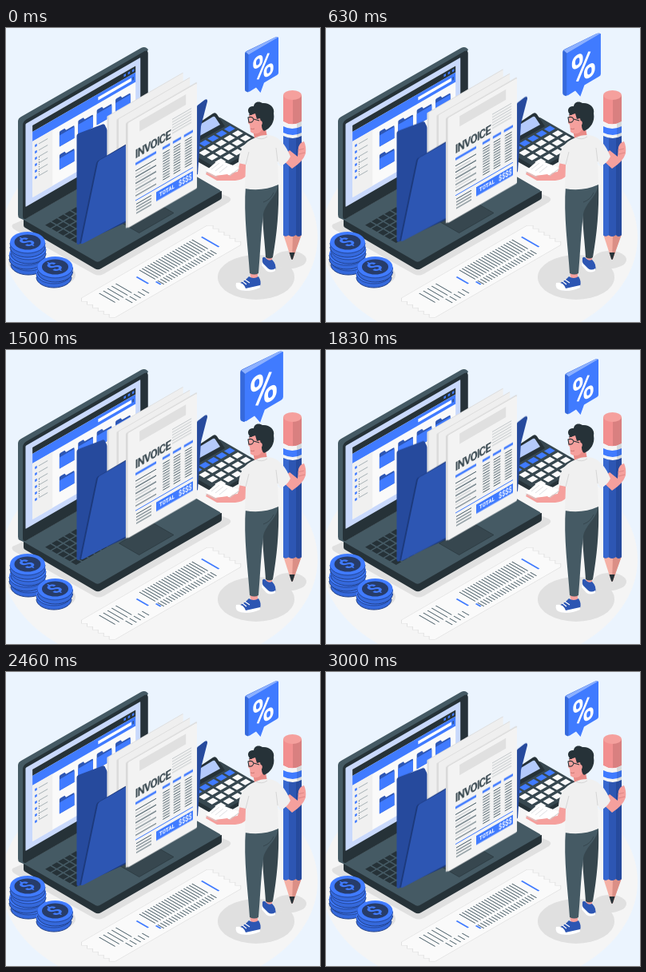
An HTML page that plays this animation: 393 px wide and 368 px high, repeating every 3040 ms.

```html
<!DOCTYPE html>
<html lang="en">
<head>
<meta charset="utf-8">
<title>Invoice on a laptop</title>
<style>
  html, body { margin: 0; width: 100%; height: 100%; overflow: hidden; background: #ebf4fe; }
  svg { display: block; width: 393px; height: 368px; }
  text { font-family: Roboto, "Liberation Sans", sans-serif; font-weight: 700; }
  .rise { animation: rise 3040ms linear infinite; }
  .pulse { transform-origin: 320px 46px; animation: pulse 3040ms linear infinite; }
  @keyframes rise { 50% { transform: translateY(var(--lift)); } }
  @keyframes pulse {
    0%, 30%, 40%, 60%, 100% { transform: scale(1); }
    10%, 50% { transform: scale(1.3); }
  }
</style>
</head>
<body>
<svg viewBox="0 0 393 368" fill="none">
  <defs>
    <g id="disc">
      <path d="M-22 0v6a22 13 0 0 0 44 0v-6z" fill="#3569dc"/>
      <path d="M-22 6a22 13 0 0 0 44 0" stroke="#203f86"/>
      <path d="M-22 1a22 13 0 0 0 44 0" stroke="#264a9d"/>
      <ellipse rx="22" ry="13" fill="#407bff"/>
    </g>
    <g id="coin">
      <use href="#disc"/>
      <ellipse rx="16.500" ry="9.600" fill="#273c69"/>
      <text transform="matrix(.866 -.5 .866 .5 -1 0)" x="-6" y="7.500" font-size="22" fill="#407bff">$</text>
    </g>
    <g id="file">
      <path d="M0 1.500q0-1.500 1.500-1.500h6l2 3H20q1.500 0 1.500 1.500V19H0z" fill="#2d56b3"/>
      <path d="M0 19V6q0-1 1-1h19.500q1 0 1 1v13z" fill="#407bff"/>
    </g>
  </defs>

  <ellipse cx="192" cy="262" rx="198" ry="138" fill="#f5f5f5"/>
  <g fill="#e0e0e0">
    <path d="M8 246q-2 4 4 7l98 55q6 3 12 0l157-90q5-4-1-7l-100-40z"/>
    <ellipse cx="313" cy="312" rx="48" ry="28"/>
    <ellipse cx="355" cy="290" rx="21" ry="11"/>
    <ellipse cx="28" cy="294" rx="25" ry="14"/>
    <ellipse cx="62" cy="309" rx="25" ry="14"/>
  </g>

  <!-- receipt -->
  <g transform="matrix(.866 -.5 .866 .5 95 338)">
    <path id="slip" d="M0 0H181l4 4-4 4 4 4-4 4 4 4-4 4 4 4-4 4 4 4-4 4 4 4-4 4H0l-4-4 4-4-4-4 4-4-4-4 4-4-4-4 4-4-4-4 4-4-4-4z" fill="#fafafa" stroke="#e0e0e0" stroke-width="1.500" paint-order="stroke"/>
    <path d="M163 10v25M66 13v17M74 33v7" stroke="#407bff" stroke-width="2"/>
    <g stroke="#455a64">
      <path d="M76 18H156" stroke-width="23" stroke-dasharray="1.100 2.900"/>
      <path d="M76 37.500H156" stroke-width="9" stroke-dasharray="1.100 2.900"/>
      <path d="M18 18H46" stroke-width="23" stroke-dasharray="1 5"/>
      <path d="M30 37.500H58" stroke-width="10" stroke-dasharray="1 5"/>
    </g>
  </g>

  <!-- laptop base -->
  <path d="M22 240V247q0 2 2 3l87 51q4 2.500 8 0l149-86q2-1 2-3v-8z" fill="#263238"/>
  <g transform="matrix(.866 -.5 .866 .5 22 240)">
    <rect width="179" height="107" rx="3" fill="#455a64"/>
    <g stroke="#263238" stroke-width="7.500" stroke-dasharray="7.500 1.800">
      <path d="M9 26H169M9 35.300H169M9 44.600H169M9 53.900H169M9 63.200H169"/>
    </g>
    <rect x="67" y="71" width="50" height="29" fill="#37474f" stroke="#2b3940" stroke-width=".7"/>
  </g>

  <!-- laptop screen -->
  <path d="M15 117q0-4 4-6L169 25q4-2 7 0l2 2-5 9L24 241l-7-3q-2-1-2-4z" fill="#455a64"/>
  <g transform="matrix(.866 -.5 0 1 21 117)">
    <rect width="181" height="124" rx="5" fill="#263238"/>
    <rect x="4" y="5" width="166" height="104" rx="1" fill="#c9d9fc"/>
    <g transform="translate(14 12)">
      <rect width="149" height="90" fill="#fafafa"/>
      <rect width="149" height="8" fill="#263238"/>
      <rect y="8" width="149" height="12" fill="#407bff"/>
      <path d="M95 14H143" stroke="#fff" stroke-width="4"/>
      <path d="M145 14h1" stroke="#263238" stroke-width="4"/>
      <path d="M132 4h3M138 4h3M144 4h3" stroke="#407bff" stroke-width="3"/>
      <rect y="20" width="29" height="70" fill="#f0f0f0"/>
      <path d="M5 26V74" stroke="#407bff" stroke-width="3" stroke-dasharray="3 5"/>
      <path d="M15.500 27V74" stroke="#a6b0b5" stroke-width="13" stroke-dasharray="1 7"/>
      <path d="M9.500 44V66" stroke="#455a64" stroke-dasharray="1 2"/>
      <use href="#file" x="39" y="27"/><use href="#file" x="66" y="27"/>
      <use href="#file" x="93" y="27"/><use href="#file" x="120" y="27"/>
      <use href="#file" x="39" y="56"/><use href="#file" x="66" y="56"/>
    </g>
  </g>

  <!-- calculator -->
  <path d="M209 144v6l57 32 56-32v-6z" fill="#263238"/>
  <g transform="matrix(.866 -.5 .866 .5 216 140)">
    <rect x="-8" width="66" height="66" rx="3" fill="#37474f"/>
    <g stroke-width="7.500" stroke-dasharray="9 3">
      <path d="M-1.500 23H55" stroke="#407bff"/>
      <path d="M-1.500 34.500H55M-1.500 46H55M-1.500 57.500H55" stroke="#fafafa"/>
    </g>
  </g>
  <path d="M232 125l27-18q3-2 5 1l10 15-35 20z" fill="#263238"/>
  <path d="M234 126l25-15q2-1 3 1l6 9-31 17z" fill="#b4cafb"/>

  <!-- folder back -->
  <g class="rise" style="--lift:-8px">
    <path d="M88.500 135q0-2 2-3l29-11q4-2 5 2l3 6 108-22 4-10 9-7q4-2 3.500 2l-8 31-4 60L95 269l-4.500 2q-2 0-2-2z" fill="#264a9d"/>
  </g>

  <!-- sheets -->
  <g class="rise" style="--lift:-10px">
    <g transform="matrix(.866 -.5 0 1 129 110)">
      <rect x="-3" y="-1" width="110" height="106" rx="1" fill="#dedede"/>
      <rect width="107" height="105" rx="1" fill="#efefef"/>
    </g>
  </g>
  <g class="rise" style="--lift:-12px">
    <g transform="matrix(.866 -.5 0 1 141 114)">
      <rect x="-3" y="-1" width="106" height="106" rx="1" fill="#dcdcdc"/>
      <rect width="103" height="105" rx="1" fill="#efefef"/>
    </g>
  </g>

  <!-- folder front -->
  <g class="rise" style="--lift:-8px">
    <path d="M92 270l21-101q1-3 4-4l34-20v98z" fill="#1d3a7c"/>
    <path d="M94 269.500l21-101q.5-2 3-3.500l34.500-19.500V240L97 269.500q-3 1.500-3 0z" fill="#2d56b3"/>
  </g>

  <g class="rise" style="--lift:-15px">
    <g transform="matrix(.866 -.5 0 1 152.500 119)">
      <rect x="-3" y="-1.500" width="103" height="132" rx="1.500" fill="#d9d9d9"/>
      <rect width="100" height="131.500" rx="1.500" fill="#f3f3f3"/>
      <rect x="17" y="6" width="67" height="13" fill="#e0e0e0"/>
      <path d="M78 27V46" stroke="#c2c7ca" stroke-width="28" stroke-dasharray="1 2.500"/>
      <text x="10.500" y="50" font-size="15" letter-spacing="-.9" fill="#37474f">INVOICE</text>
      <path d="M11 57H41M50 57H61M65 57H77M81 57H94" stroke="#407bff" stroke-width="3"/>
      <g stroke="#455a64">
        <path d="M26 65V99" stroke-width="30" stroke-dasharray="1.100 6.700"/>
        <path d="M22 69V99" stroke-width="22" stroke="#a9b1b5" stroke-dasharray=".7 7.100"/>
        <path d="M55.500 63V99M71 63V99M87.500 63V99" stroke-width="10" stroke-dasharray="1 2.300"/>
        <path d="M23 107V122" stroke-width="22" stroke-dasharray="1 2.800"/>
      </g>
      <path d="M11 102.500H94" stroke="#407bff" stroke-width="1"/>
      <rect x="41" y="107" width="53" height="11.500" fill="#407bff"/>
      <g fill="#fff">
        <text x="45.500" y="115.500" font-size="7.300">TOTAL</text>
        <text x="73.500" y="115.800" font-size="8.300">$$$$</text>
      </g>
    </g>
  </g>

  <!-- coins -->
  <use href="#disc" x="28" y="290"/><use href="#disc" x="26" y="283"/>
  <use href="#disc" x="28" y="276"/><use href="#coin" x="27" y="268"/>
  <use href="#disc" x="60" y="306"/><use href="#coin" x="61.500" y="299"/>

  <!-- percent bubble -->
  <g class="pulse">
    <path d="M299 32q0-2 2-3l35-17q3-1.500 5 0l-10 30-28 38.500-2.500-1q-1.500-.500-1.500-2.500z" fill="#3569dc"/>
    <path d="M300 30l36-18q3-1.500 5 0l-37 21.500z" fill="#8cb0ff"/>
    <path d="M303.500 35q0-1.500 1.500-2.500L340 12q1-.500 1 1v43q0 2-2 3l-16 9.500-4.500 12.500-5.500-6.500-8 5q-1.500 1-1.500-1z" fill="#407bff"/>
    <text transform="matrix(.866 -.5 0 1 307.500 72)" font-size="45" fill="#fff">%</text>
  </g>

  <!-- pencil -->
  <path d="M347 258h23l-11 31q-1 2-2 0z" fill="#f5b0a5"/>
  <path d="M359 258h11l-11 31-1 1z" fill="#db8f86"/>
  <path d="M354.500 281h7l-2.500 8q-1 2-2 0z" fill="#263238"/>
  <path d="M347 134h23v125q-4 4-7 0-5 4-10 0-4 3-6 0z" fill="#2d56b3"/>
  <path d="M347 134h7v125q-4 3-7 0z" fill="#3767cf"/>
  <path d="M363 134h7v125q-4 3-7 0z" fill="#264a9d"/>
  <path d="M347 84v33q11 7 23 0V84z" fill="#f28f8f"/>
  <path d="M359 84v36q6 0 11-3V84z" fill="#d98080"/>
  <ellipse cx="358.500" cy="84" rx="11.500" ry="6" fill="#f5a09d"/>
  <path d="M347 117q11 7 23 0v18q-11 6-23 0z" fill="#f5f5f5"/>
  <path d="M347 123q11 6 23 0v8q-11 6-23 0z" fill="#407bff"/>
  <path d="M364 119.500l6-2.500v18l-6 2z" fill="#263238" opacity=".14"/>

  <!-- feet and legs -->
  <path d="M325 284h8v9l-6 3zM305 304h10v10l-8 3z" fill="#f5a09d"/>
  <path d="M321 288q2-3 5 1 3 3 7 1 6 6 4 13-6 4-11-1-6-6-5-14z" fill="#2d56b3"/>
  <path d="M320 293l8 8q4 3 9 0v3q-6 3-11 0l-6-7z" fill="#fff"/>
  <path d="M304 311q6 4 12 0 4 6 2 12-12 6-23 5-8-2-7-7 10-3 16-10z" fill="#2d56b3"/>
  <path d="M288 319q9-2 12 7l18-4v3q-14 6-25 3-7-2-5-9z" fill="#fff"/>
  <path d="M299 315l6 4M296 317l5 4" stroke="#fff" stroke-width="1.200"/>
  <path d="M319 196h22c1 32-2 62-7 91q-4 3-9 0c-1-19-4-38-4-62z" fill="#37474f"/>
  <path d="M300 197l41-2c-2 17-16 23-19 38-3 24-4 50-6 74q-5 3-11 0c-2-33-8-72-5-110z" fill="#455a64"/>
  <path d="M322 218q9-3 13-12" stroke="#37474f"/>

  <!-- arms and body -->
  <path d="M293 167l12 3c1 13-6 20-18 21l-23 0-14-8 2-4 16 4 22-3z" fill="#f5a09d"/>
  <path d="M250 179l16-14 26 10-12 9-18 1z" fill="#fff"/>
  <path d="M257 177l10-8M262 179l10-8M267 181l10-8" stroke="#d5d9dc" stroke-width=".8"/>
  <path d="M250 180l12 6 18-1 12-9" stroke="#cfcfcf"/>
  <path d="M263 185l14-2 5 4-9 4z" fill="#f5a09d"/>
  <path d="M344 163l11-10 10 8 1-12q2-6 7-7 3 6 2 15-3 10-17 19z" fill="#f5a09d"/>
  <path d="M365 153l8-2M366 158l8-2" stroke="#d98080" stroke-width=".8"/>
  <path d="M309 127l15-7 3 17q-7 7-16 1z" fill="#e98b87"/>
  <path d="M313 137c8-4 20-4 27 1 8 6 13 15 16 23q-4 8-12 12l-4-6 1 29q-20 9-42 5l1-30-9-2c1-14 5-26 22-32z" fill="#f0f0f0"/>
  <path d="M340 167l-2-17M300 171l4-16M313 137q7 4 14-1" stroke="#d6d6d6"/>

  <!-- head -->
  <path d="M306 104q-3 8-3 15l2 2 1 9q5 4 11 1l9-9-2-20z" fill="#f5a09d"/>
  <path d="M306 109c-6-6-2-12 4-11 1-7 8-6 11-4 8-1 16 5 14 13 2 10-4 19-12 22q-3-2-3-7l-2-9-4 1-2-7z" fill="#263238"/>
  <circle cx="317.500" cy="119" r="3.300" fill="#f5a09d"/>
  <path d="M303 112q5-2 7 2-1 5-6 4zM310 114l7 2M304 109l4-1" stroke="#263238" stroke-width="1.100"/>
  <path d="M306 126q3 1 5 0" stroke="#c76f6c" stroke-width=".9"/>
</svg>
</body>
</html>
```
